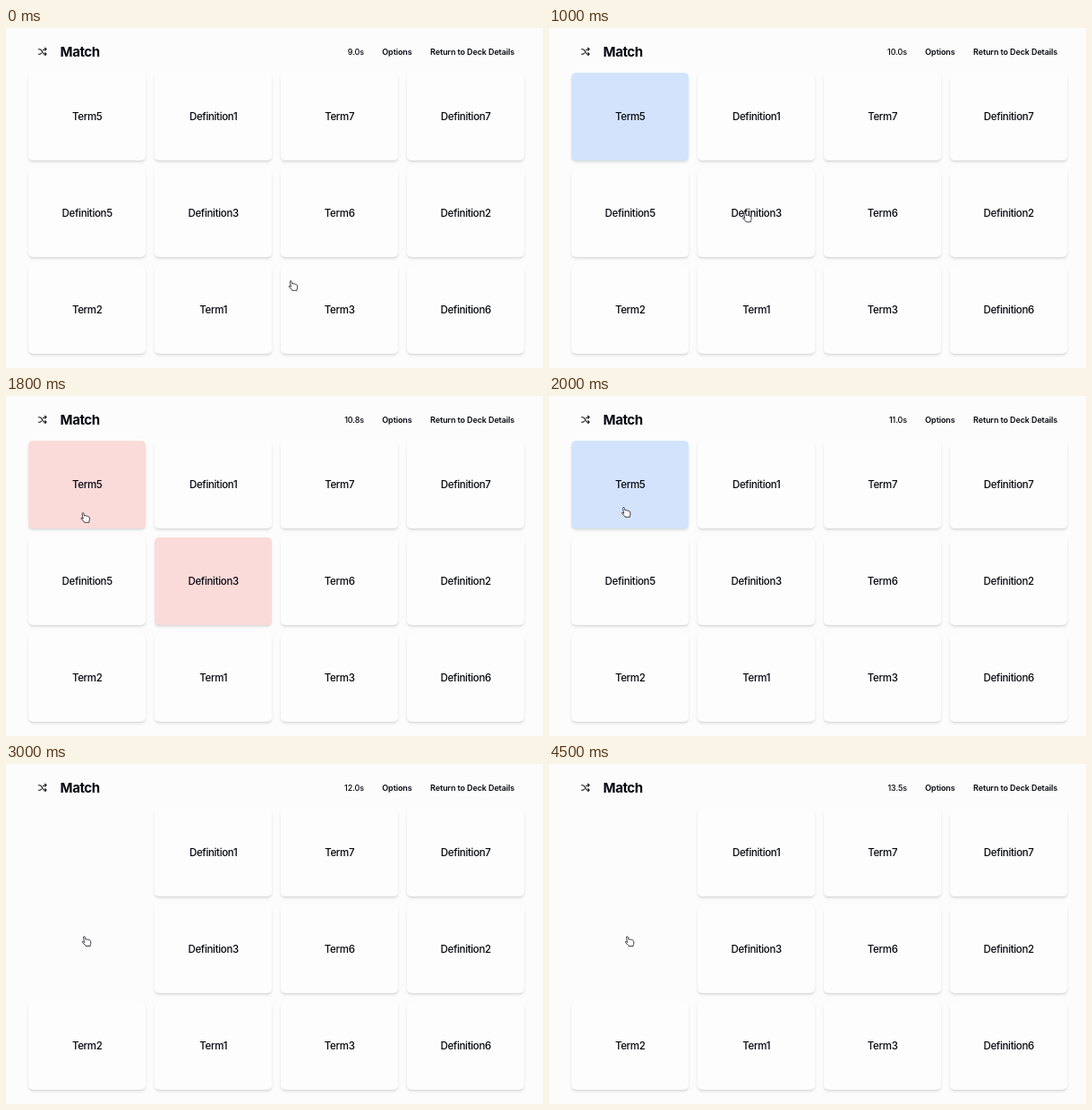
Write an HTML page that moves like this. It is 600 px wide and 380 px high and loops after 4600 ms.

```html
<!DOCTYPE html>
<html lang="en">
<head>
<meta charset="utf-8">
<title>Match</title>
<style>
  html, body { margin: 0; width: 100%; height: 100%; overflow: hidden; background: #fcfcfd; }
  body { position: relative; color: #06070f; font-family: Inter, "Open Sans", sans-serif; }
  body > * { position: absolute; white-space: nowrap; }
  h1 { left: 60.6px; top: 17px; margin: 0; font: 650 15px/20px Inter, sans-serif; letter-spacing: -.42px; }
  .nav { top: 20px; font-size: 9px; line-height: 13px; font-weight: 600; letter-spacing: -.1px; }
  #timer { right: calc(100% - 400px); font-weight: 500; }
  .card {
    width: 131px; height: 98px; line-height: 98px; border-radius: 5px;
    text-align: center; font-size: 11.5px; font-weight: 500; letter-spacing: -.33px; background: #fdfdfd;
    box-shadow: 0 2.4px 3.6px -.6px rgba(0,0,0,.12), 0 1.2px 2.4px -1.2px rgba(0,0,0,.12);
  }
  svg { left: 0; top: 0; overflow: visible; fill: none; stroke: #14141c; stroke-linecap: round; stroke-linejoin: round; }
</style>
</head>
<body>
<svg width="600" height="380" stroke-width="1.1">
  <path d="M36.4 23.7h1q1.2 0 2 1.1l2 3.3q.8 1.1 2 1.1h1.6M36.4 29.2h1q1.2 0 2-1.1M41.4 24.8q.8-1.1 2-1.1h1.6M43.6 22.2l1.5 1.5-1.5 1.5M43.6 27.7l1.5 1.5-1.5 1.5"/>
</svg>
<h1>Match</h1>
<span class="nav" id="timer"></span>
<span class="nav" style="left:420.3px">Options</span>
<span class="nav" style="left:474px">Return to Deck Details</span>
<script>
  const LOOP = 4600, STEP = 100;
  const BLUE = '#d3e3fb', RED = '#fbdbda', PLAIN = '#fdfdfd';
  const labels = ['Term5', 'Definition1', 'Term7', 'Definition7',
                  'Definition5', 'Definition3', 'Term6', 'Definition2',
                  'Term2', 'Term1', 'Term3', 'Definition6'];
  const cards = {};
  labels.forEach((label, i) => {
    const card = document.createElement('div');
    card.className = 'card';
    card.textContent = label;
    card.style.left = 25.2 + 141 * (i % 4) + 'px';
    card.style.top = 49.6 + 108.2 * Math.floor(i / 4) + 'px';
    document.body.append(card);
    cards[label] = card;
  });
  document.body.insertAdjacentHTML('beforeend', `<svg width="600" height="380" stroke-width=".8">
    <path id="hand" fill="#fff" d="M-1.3 5.4L-2.2.2q-.1-1.1.8-1.2.8 0 1 .9L.3 2.6q.5-.6 1.2-.5.7 0 .9.7.5-.4 1.1-.2.6.1.8.7.5-.2 1 .1.5.3.6 1.1l.2 1.9q0 1.3-.6 2.2v1.2H.3L-.2 8.7-3 6.2q-.8-.8-.2-1.3.7-.5 1.9.5z"/></svg>`);
  const hand = document.getElementById('hand');
  const timer = document.getElementById('timer');

  // Pointer stops: time, x, y of the fingertip
  const stops = [[0, 319.5, 283.5], [600, 123, 136], [700, 104, 128], [1000, 220, 207],
                 [1300, 220, 207], [1800, 87.3, 131.5], [2000, 84.8, 125.5], [2100, 85, 128],
                 [2400, 88.7, 193.7], [4600, 88.7, 193.7]];
  const shake = [-2.6, 2.5, -1, .5];

  function pointer(t) {
    const i = stops.findIndex(s => s[0] > t);
    const [t0, x0, y0] = stops[i - 1], [t1, x1, y1] = stops[i];
    const p = (t - t0) / (t1 - t0), k = p * p * (3 - 2 * p);
    return `translate(${x0 + (x1 - x0) * k} ${y0 + (y1 - y0) * k})`;
  }

  function draw(now) {
    const t = Math.floor(now % LOOP / STEP) * STEP;
    const wrong = t >= 1200 && t < 1900, matched = t >= 2800;
    const first = t >= 700 && t < 1200 || t >= 2000;
    const paint = (label, color) => cards[label].style.background = color;

    timer.textContent = (9 + t / 1000).toFixed(1) + 's';
    hand.setAttribute('transform', pointer(t));
    paint('Term5', wrong ? RED : first ? BLUE : PLAIN);
    paint('Definition3', wrong ? RED : PLAIN);
    paint('Definition5', t >= 2500 ? BLUE : PLAIN);
    for (const label of ['Term5', 'Definition3'])
      cards[label].style.transform = `translateX(${shake[(t - 1200) / STEP] || 0}px)`;
    for (const label of ['Term5', 'Definition5'])
      cards[label].style.visibility = matched ? 'hidden' : 'visible';
  }

  const start = performance.now();
  (function tick() {
    draw(performance.now() - start);
    requestAnimationFrame(tick);
  })();
</script>
</body>
</html>
```
